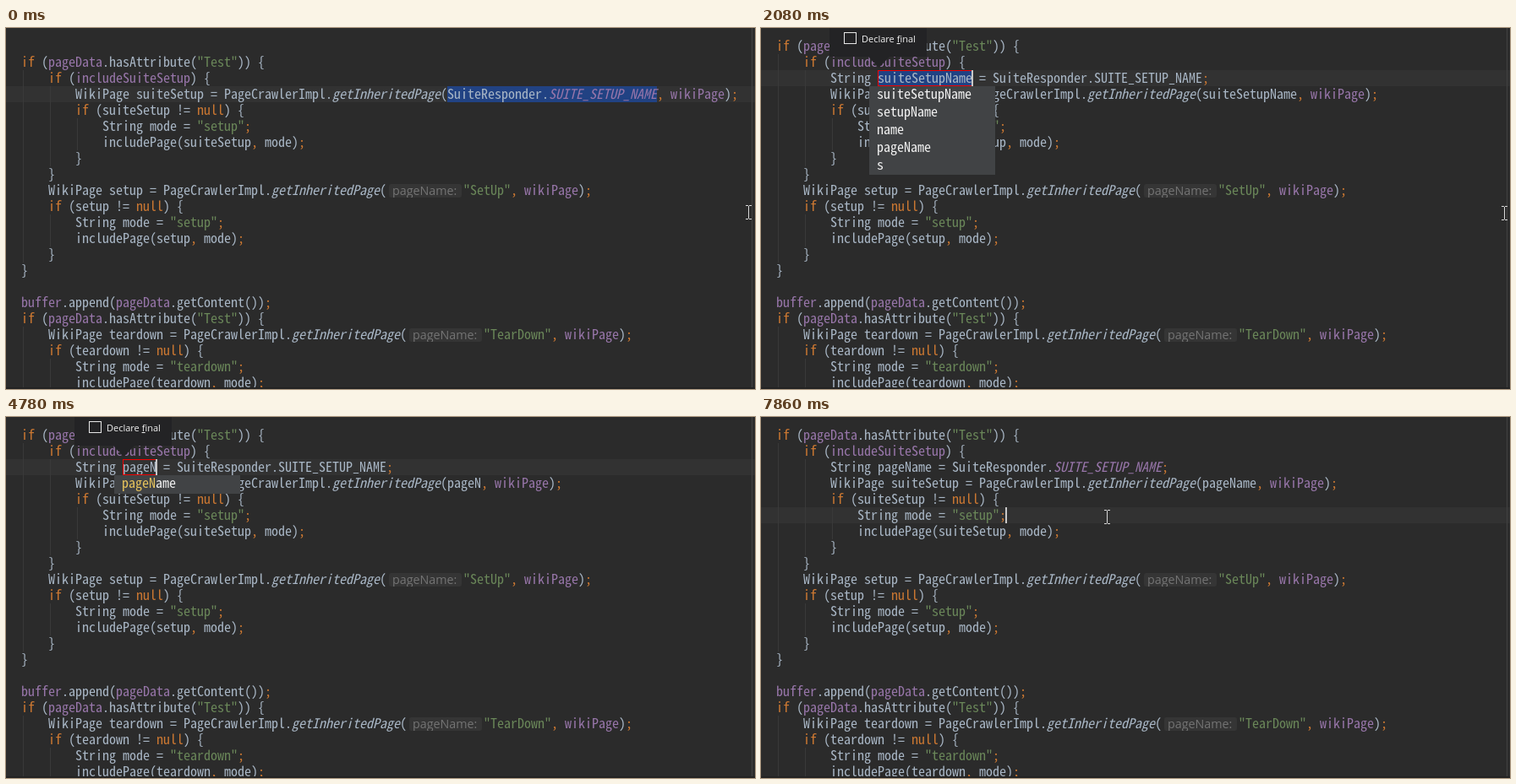
These frames come from a looping animation (886x428 px, 8 s). An HTML page with a canvas:

```html
<!DOCTYPE html>
<html lang="en">
<head>
<meta charset="utf-8">
<title>Introduce variable</title>
<style>
  html, body { margin: 0; width: 100%; height: 100%; overflow: hidden; background: #2b2b2b; }
  canvas { display: block; }
</style>
</head>
<body>
<canvas id="stage" width="886" height="428"></canvas>
<script>
const LOOP = 8000, LEFT = 18, TOP = 12, CELL = 8, ROW = 19, HINT_WIDTH = 91;
const MONO = '"Noto Sans Mono CJK KR", "Noto Sans Mono CJK JP", "Noto Sans Mono", monospace';
const SANS = '"Open Sans", "Noto Sans", sans-serif';
const ctx = document.getElementById('stage').getContext('2d');

// Font size whose advance is exactly one cell.
ctx.font = `100px ${MONO}`;
const codeFont = `${CELL * 100 / ctx.measureText('0').width}px ${MONO}`;

const HEAD = ['if (pageData.hasAttribute("Test")) {', '    if (includeSuiteSetup) {'];
// "~" marks an inline parameter hint.
const TAIL = `        if (suiteSetup != null) {
            String mode = "setup";
            includePage(suiteSetup, mode);
        }
    }
    WikiPage setup = PageCrawlerImpl.getInheritedPage(~"SetUp", wikiPage);
    if (setup != null) {
        String mode = "setup";
        includePage(setup, mode);
    }
}

buffer.append(pageData.getContent());
if (pageData.hasAttribute("Test")) {
    WikiPage teardown = PageCrawlerImpl.getInheritedPage(~"TearDown", wikiPage);
    if (teardown != null) {
        String mode = "teardown";
        includePage(teardown, mode);`.split('\n');
const SUGGESTIONS = ['suiteSetupName', 'setupName', 'name', 'pageName', 's'];

const TEXT = '#a9b7c6', FIELD = '#9876aa';
const RULES = [
  [/^"/, '#6a8759'],
  [/^(if|null|[;,])$/, '#cc7832'],
  [/^(pageData|includeSuiteSetup|wikiPage|buffer|SUITE_SETUP_NAME)$/, FIELD]
];

// Start time and value; a value holds until the next entry.
const NAME = [[0, ''], [1740, 'suiteSetupName'], [4250, 'pa'], [4370, 'pag'], [4470, 'page'],
  [4780, 'pageN'], [5040, 'pageNam'], [5250, 'pageName']];
const CARET = [[0, 0], [440, 1], [960, 0], [1420, 1], [2720, 0], [3270, 1], [3700, 0],
  [4250, 1], [5980, 0], [6410, 1], [6890, 0], [7430, 1]];
const MOUSE = [[0, [878, 218]], [750, [879, 219]], [4250, null], [6410, [613, 143]],
  [6530, [533, 126]], [6630, [440, 113]], [6740, [380, 110]], [6890, [347, 113]],
  [6990, [322, 117]], [7080, [309, 119]], [7170, [307, 120]], [7320, [312, 121]],
  [7540, [335, 123]], [7640, [372, 121]], [7750, [400, 119]], [7860, [409, 118]]];

const at = (track, t) => track.findLast(([start]) => start <= t)[1];
const colX = col => LEFT + col * CELL;
const rowY = row => TOP + row * ROW;

function rect(color, x, y, w, h) {
  ctx.fillStyle = color;
  ctx.fillRect(x, y, w, h);
}

function text(string, x, y, color, font = codeFont) {
  ctx.font = font;
  ctx.fillStyle = color;
  ctx.fillText(string, x, y);
}

function hint(x, y) {
  ctx.save();
  ctx.beginPath();
  ctx.roundRect(x + 3, y + 2, 86, 16, 3);
  ctx.fillStyle = '#353535';
  ctx.fill();
  ctx.clip();
  text('pageName:', x + 7, y + 15, '#747474', `14.3px ${SANS}`);
  ctx.restore();
}

function codeLine(line, row, plain) {
  const y = rowY(row), indent = line.search(/\S/);
  for (let col = 0; col < indent; col += 4) rect('#393939', colX(col) + 2, y, 1, ROW);
  let x = LEFT;
  for (const token of line.match(/"[^"]*"|\w+|\s+|[^\w\s]/g) || []) {
    if (token === '~') {
      hint(x, y);
      x += HINT_WIDTH;
      continue;
    }
    const constant = token === 'SUITE_SETUP_NAME';
    const italic = token === 'getInheritedPage' || constant && !plain;
    const rule = RULES.find(([pattern]) => pattern.test(token));
    const color = rule && !(constant && plain) ? rule[1] : TEXT;
    text(token, x, y + 15, color, (italic ? 'italic ' : '') + codeFont);
    x += token.length * CELL;
  }
}

function optionBalloon() {
  ctx.fillStyle = '#232325';
  ctx.beginPath();
  ctx.rect(81, 0, 115, 34);
  ctx.moveTo(127, 34);
  ctx.lineTo(152, 34);
  ctx.lineTo(139.5, 47);
  ctx.fill();
  ctx.strokeStyle = '#e8e8e8';
  ctx.strokeRect(98.5, 5.5, 14, 13);
  const font = `11px ${SANS}`;
  text('Declare final', 119, 17, '#f0f0f0', font);
  rect('#f0f0f0', 119 + ctx.measureText('Declare ').width, 18, 4, 1);
}

function suggestions(items, prefix) {
  rect('#414345', 128, 69, 149, Math.max(22, items.length * 21));
  items.forEach((item, i) => {
    const y = 84 + i * 21;
    text(item, 137, y, '#f2f2f2');
    if (prefix) {
      rect('#414345', 137, y - 14, prefix.length * CELL, 19);
      text(prefix, 137, y, '#e6c35c');
    }
  });
}

function mousePointer([x, y]) {
  const color = '#d8d8d8';
  rect(color, x, y - 7, 1, 15);
  for (const edge of [y - 8, y + 8]) {
    rect(color, x - 3, edge, 3, 1);
    rect(color, x + 1, edge, 3, 1);
  }
}

function draw(t) {
  const name = at(NAME, t);
  const extracted = t >= 1740, editing = extracted && t < 5670;
  const selecting = editing && t < 4250, clicked = t >= 7430;
  const nameX = colX(15), argX = colX(63), nameWidth = name.length * CELL;
  const caretRow = editing ? 2 : clicked ? 5 : 3;
  const caretX = !extracted ? argX + 31 * CELL : editing ? nameX + nameWidth : clicked ? colX(34) : argX;

  rect('#2b2b2b', 0, 0, 886, 428);
  rect('#323232', 0, rowY(caretRow), 886, ROW);
  rect('#424242', 882, 0, 1, 428);

  if (!extracted) rect('#214283', argX, rowY(3), 31 * CELL, ROW);
  if (selecting) rect('#214283', nameX, rowY(2), nameWidth, ROW);
  if (t >= 5980 && t < 7640) {
    rect('#40332b', nameX, rowY(2), nameWidth, ROW);
    rect('#344134', argX, rowY(3), nameWidth, ROW);
  }

  const value = 'SuiteResponder.SUITE_SETUP_NAME';
  HEAD.forEach((line, i) => codeLine(line, i + (extracted ? 0 : 1)));
  if (extracted) codeLine(`        String ${name} = ${value};`, 2, editing);
  codeLine(`        WikiPage suiteSetup = PageCrawlerImpl.getInheritedPage(${name || value}, wikiPage);`, 3);
  TAIL.forEach((line, i) => codeLine(line, i + 4));
  rect('#232323', 0, 426, 886, 2);

  if (editing) {
    ctx.lineWidth = 1;
    ctx.strokeStyle = '#f00000';
    ctx.strokeRect(nameX + .5, rowY(2) + .5, nameWidth - 1, ROW - 1);
    if (t >= 1870) {
      optionBalloon();
      ctx.globalAlpha = t < 2080 ? .7 : 1;
      suggestions(selecting ? SUGGESTIONS : ['pageName'], selecting ? '' : name);
      ctx.globalAlpha = 1;
    }
  }
  if (at(CARET, t)) rect('#c8c8c8', caretX - 1, rowY(caretRow), 2, ROW);
  const mouse = at(MOUSE, t);
  if (mouse) mousePointer(mouse);
}

const start = performance.now();
function tick() {
  draw((performance.now() - start) % LOOP);
  requestAnimationFrame(tick);
}
tick();
</script>
</body>
</html>
```
